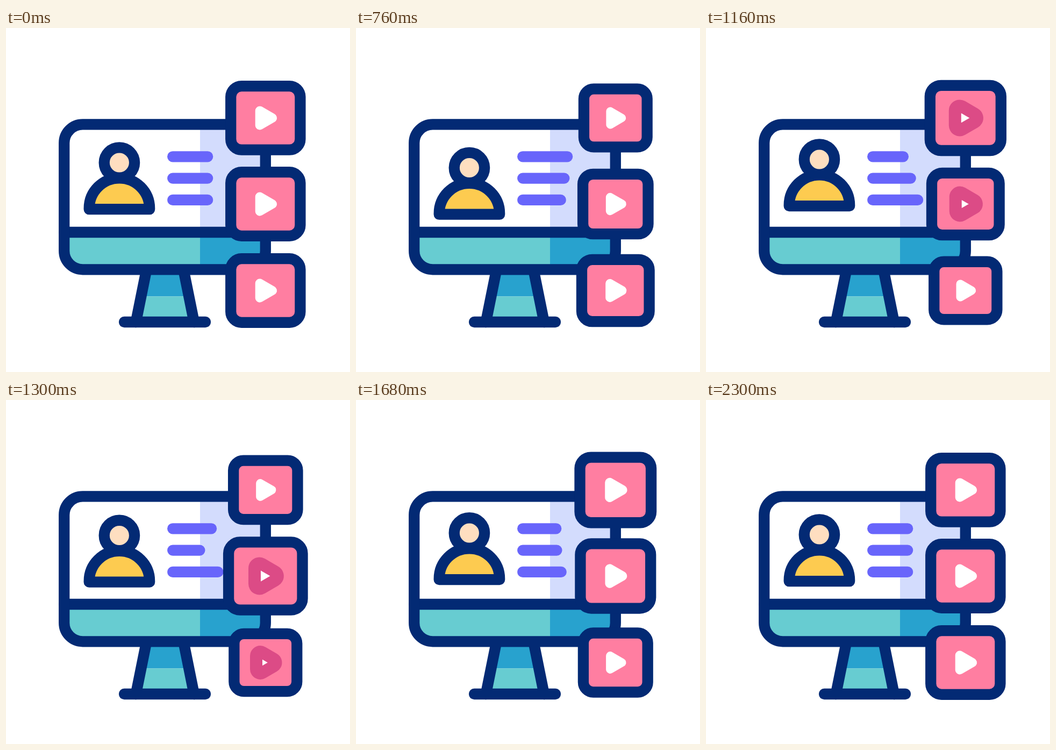
Recreate the animation shown at these times as an HTML page with a canvas. Size 640 by 640 pixels, loop 2.4 s.

```html
<!DOCTYPE html>
<html lang="en">
<head>
<meta charset="utf-8">
<title>Video profile</title>
<style>
  html, body { margin: 0; width: 100%; height: 100%; overflow: hidden; background: #fff; }
  canvas { display: block; width: 640px; height: 640px; }
</style>
</head>
<body>
<canvas id="stage" width="640" height="640"></canvas>
<script>
const ctx = document.getElementById('stage').getContext('2d');

const LOOP = 2400, STEP = 20, STAGGER = 180, LINE = 20.3;
const PRESS = { from: 920, to: 1220 };
const COLOR = {
  navy: '#032a74', pink: '#ff7ea1', rose: '#dc4b86', teal: '#67ccd1', blue: '#28a2ce',
  lavender: '#d3dcfd', violet: '#6865fb', yellow: '#fdcb50', skin: '#fedec0', white: '#fff'
};

// Wind up slowly, release, then settle through three swings.
const TIMES = [120, 928, 1055, 1285, 1590, 1850];
const SWING = {
  box: [1, 0.9, 1.098, 0.923, 1.036, 1],
  bar: [0, 20.3, -20, 7, -4, 0],
  person: [0, 10.7, -11.8, 1.5, -4.25, 0]
};

const ease = u => u * u * (3 - 2 * u);

function swing(values, time) {
  if (time <= TIMES[0]) return values[0];
  for (let i = 1; i < TIMES.length; i++) {
    if (time < TIMES[i]) {
      const u = (time - TIMES[i - 1]) / (TIMES[i] - TIMES[i - 1]);
      return values[i - 1] + (values[i] - values[i - 1]) * ease(u);
    }
  }
  return values[values.length - 1];
}

function fill(color) {
  ctx.fillStyle = color;
  ctx.fill();
}

function stroke(color, width = LINE) {
  ctx.strokeStyle = color;
  ctx.lineWidth = width;
  ctx.stroke();
}

function rect(color, x, y, w, h) {
  ctx.fillStyle = color;
  ctx.fillRect(x, y, w, h);
}

function line(color, x1, y1, x2, y2) {
  ctx.beginPath();
  ctx.moveTo(x1, y1);
  ctx.lineTo(x2, y2);
  stroke(color);
}

function roundedRect(x, y, w, h, r) {
  ctx.beginPath();
  ctx.roundRect(x, y, w, h, r);
}

function drawStand() {
  ctx.beginPath();
  ctx.moveTo(261, 450);
  ctx.lineTo(331, 450);
  ctx.lineTo(349, 547);
  ctx.lineTo(243, 547);
  ctx.closePath();
  ctx.save();
  ctx.clip();
  rect(COLOR.blue, 230, 445, 130, 54.3);
  rect(COLOR.teal, 230, 499.3, 130, 50);
  ctx.restore();
  line(COLOR.navy, 261.3, 450, 241.7, 547);
  line(COLOR.navy, 330.3, 450, 349.9, 547);
  line(COLOR.navy, 220, 547, 371, 547);
}

function drawMonitor() {
  const outline = () => roundedRect(108.2, 179.4, 374.6, 269.9, 34.5);
  ctx.save();
  outline();
  ctx.clip();
  rect(COLOR.white, 100, 170, 261, 210);
  rect(COLOR.lavender, 361, 170, 130, 210);
  rect(COLOR.teal, 100, 380, 261, 80);
  rect(COLOR.blue, 361, 380, 130, 80);
  ctx.restore();
  line(COLOR.navy, 108.2, 380, 482.8, 380);
  outline();
  stroke(COLOR.navy);
}

function drawPerson(time) {
  ctx.save();
  ctx.translate(210.9, swing(SWING.person, time));
  ctx.beginPath();
  ctx.moveTo(-56.2, 337.2);
  ctx.arc(0, 335.5, 56.2, Math.PI, 0);
  ctx.lineTo(56.2, 337.2);
  ctx.closePath();
  fill(COLOR.yellow);
  stroke(COLOR.navy);
  ctx.beginPath();
  ctx.arc(0, 250.5, 28.2, 0, Math.PI * 2);
  fill(COLOR.skin);
  stroke(COLOR.navy);
  ctx.restore();
}

function drawBar(y, time) {
  line(COLOR.violet, 310.2, y, 375.1 + swing(SWING.bar, time), y);
}

function playPath(scale) {
  const r = 8.5 * scale;
  const left = -10.6 * scale, right = 12.7 * scale, half = 13.5 * scale;
  const deg = Math.PI / 180;
  ctx.beginPath();
  ctx.arc(left, half, r, 60 * deg, 180 * deg);
  ctx.arc(left, -half, r, 180 * deg, 300 * deg);
  ctx.arc(right, 0, r, -60 * deg, 60 * deg);
  ctx.closePath();
}

function drawVideo(y, time) {
  const scale = swing(SWING.box, time);
  const w = 129.2 * scale, h = 118.6 * scale;
  ctx.save();
  ctx.translate(482.8, y);
  roundedRect(-w / 2, -h / 2, w, h, 20 * scale);
  fill(COLOR.pink);
  stroke(COLOR.navy);
  playPath(scale);
  fill(COLOR.white);
  if (time >= PRESS.from && time < PRESS.to) stroke(COLOR.rose, 23);
  ctx.restore();
}

function draw(time) {
  rect(COLOR.white, 0, 0, 640, 640);
  ctx.lineCap = ctx.lineJoin = 'round';
  drawStand();
  drawMonitor();
  drawPerson(time);
  [239.3, 279.6, 319.9].forEach((y, i) => drawBar(y, time - i * STAGGER));
  [167.4, 327.5, 488.5].forEach((y, i) => drawVideo(y, time - i * STAGGER));
}

const start = performance.now();

function tick() {
  const time = (performance.now() - start) % LOOP;
  draw(Math.floor(time / STEP) * STEP);
  requestAnimationFrame(tick);
}

tick();
</script>
</body>
</html>
```
